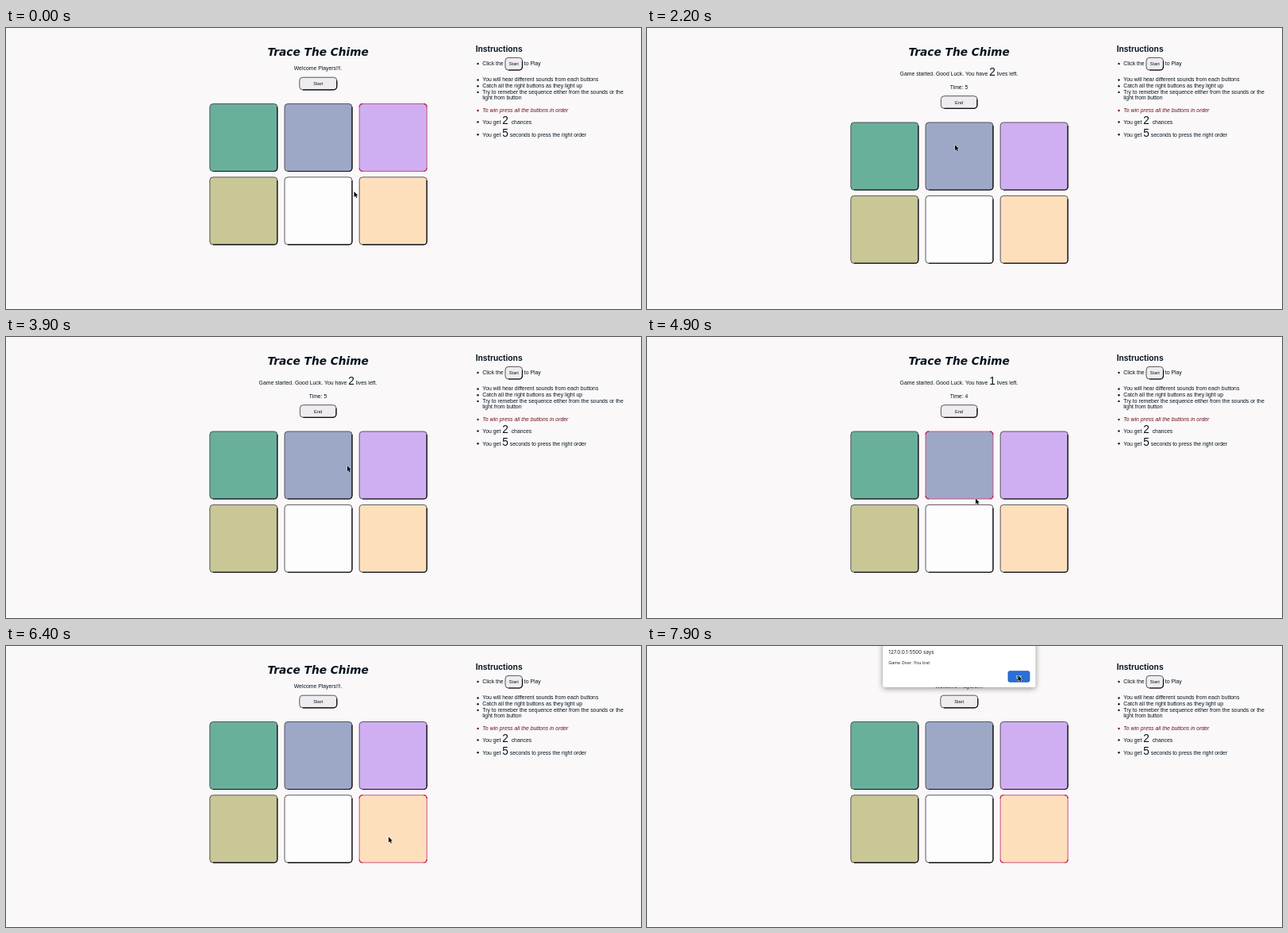
Write an HTML page with a canvas that moves like this. It is 800x354 px and loops after 8000 ms.

```html
<!DOCTYPE html>
<html lang="en">
<head>
<meta charset="utf-8">
<title>Trace The Chime</title>
<style>
  html, body { margin: 0; width: 100%; height: 100%; overflow: hidden; background: #faf8f9; }
  canvas { display: block; width: 800px; height: 354px; }
</style>
</head>
<body>
<canvas id="stage"></canvas>
<script>
const W = 800, H = 354, LOOP = 8000, STEP = 100;
const canvas = document.getElementById('stage');
const ctx = canvas.getContext('2d');
const dpr = window.devicePixelRatio || 1;
canvas.width = W * dpr;
canvas.height = H * dpr;

const SANS = '"Liberation Sans", Arial, sans-serif';
const TITLE = 'italic bold 13.73px "DejaVu Sans", Verdana, sans-serif';
const BODY = '6.87px ' + SANS;
const BIG = '13.73px ' + SANS;
const SMALL = '5.72px ' + SANS;
const INK = '#07141f', MAROON = '#6b0f1a';

const COLORS = ['#69b09c', '#9da8c6', '#cfaff1', '#c9c796', '#fefdfe', '#fddfbc'];
const TILE = 85, BLUE = 1, PURPLE = 2, PEACH = 5, START = 6;

// Moments of the game, in ms
const BEGIN = 1450, PLAYABLE = 4250, WRONG = 4650, TICK_4 = 4650, TICK_3 = 5650,
      LOST = 6250, ALERT = 6650, OK_HOVER = 7650;

// Pointer stops: time, x, y
const PATH = [
  [0, 438.5, 206], [50, 438.5, 206], [700, 399.5, 71], [1400, 399.5, 71],
  [2200, 388, 147.2], [3000, 388, 147.2], [3900, 430, 162.3], [4500, 416, 172],
  [4700, 416, 172], [4900, 414, 203.5], [5600, 482, 240.5], [7150, 482, 240.5],
  [7800, 467.5, 37]
];

function pointerAt(t) {
  const next = PATH.findIndex(p => p[0] > t);
  if (next < 0) return PATH[PATH.length - 1].slice(1);
  const [t0, x0, y0] = PATH[next - 1], [t1, x1, y1] = PATH[next];
  const u = (t - t0) / (t1 - t0), e = u * u * (3 - 2 * u);
  return [x0 + (x1 - x0) * e, y0 + (y1 - y0) * e];
}

function text(str, x, y, font = BODY, color = INK, align = 'left') {
  ctx.font = font;
  ctx.fillStyle = color;
  ctx.textAlign = align;
  ctx.fillText(str, x, y);
}

function widthOf(str, font) {
  ctx.font = font;
  return ctx.measureText(str).width;
}

// Draws [string, font] pairs one after another
function run(parts, x, y, centered) {
  if (centered) x -= parts.reduce((sum, [s, f]) => sum + widthOf(s, f), 0) / 2;
  for (const [s, f] of parts) {
    text(s, x, y, f);
    x += widthOf(s, f);
  }
}

function roundRect(x, y, w, h, r) {
  ctx.beginPath();
  ctx.roundRect(x, y, w, h, r);
}

function button(x, y, w, h, fill, hovered) {
  const r = 4;
  roundRect(x, y, w, h, r);
  ctx.fillStyle = fill;
  ctx.fill();
  ctx.lineWidth = 0.9;
  ctx.strokeStyle = hovered ? '#cb3f7c' : '#4a464c';
  ctx.stroke();
  if (hovered) {
    ctx.strokeStyle = '#c01f55';
    ctx.lineWidth = 1.3;
    for (const [cx, cy, a] of [[x + r, y + r, 2], [x + w - r, y + r, 3],
                               [x + w - r, y + h - r, 0], [x + r, y + h - r, 1]]) {
      ctx.beginPath();
      ctx.arc(cx, cy, r, a * Math.PI / 2, (a + 1) * Math.PI / 2);
      ctx.stroke();
    }
    return;
  }
  ctx.strokeStyle = '#0c0a10';
  ctx.lineWidth = 1.2;
  ctx.beginPath();
  ctx.moveTo(x + w, y + r);
  ctx.arcTo(x + w, y + h, x + w - r, y + h, r);
  ctx.lineTo(x + r, y + h);
  ctx.stroke();
}

function bullet(y, color = INK) {
  ctx.beginPath();
  ctx.arc(594.5, y, 1.2, 0, 7);
  ctx.fillStyle = color;
  ctx.fill();
}

function instructions() {
  const x = 600.3;
  text('Instructions', 591.7, 30.2, 'bold 10.3px ' + SANS);
  bullet(45);
  text('Click the', x, 47.3);
  button(629, 37.4, 21.5, 15.6, '#eeecee');
  text('Start', 639.8, 47.1, SMALL, INK, 'center');
  text('to Play', 652.8, 47.3);
  ['You will hear different sounds from each buttons',
   'Catch all the right buttons as they light up',
   'Try to remeber the sequence either from the sounds or the',
   'light from button'].forEach((line, i) => {
    if (i < 3) bullet(65.5 + i * 7.7);
    text(line, x, 67.3 + i * 7.7);
  });
  bullet(104, MAROON);
  text('To win press all the buttons in order', x, 106, 'italic ' + BODY, MAROON);
  bullet(118.5);
  run([['You get ', BODY], ['2 ', BIG], ['chances', BODY]], x, 120.7);
  bullet(134.3);
  run([['You get ', BODY], ['5', BIG], [' seconds to press the right order', BODY]], x, 136.5);
}

function tileBox(i, top) {
  return [256.8 + (i % 3) * 94.2, top + Math.floor(i / 3) * 92.4, TILE, TILE];
}

const inside = ([px, py], [x, y, w, h]) => px >= x && px <= x + w && py >= y && py <= y + h;

function hoveredItem(t, pointer, top) {
  if (t < 150) return PURPLE;
  if (t > ALERT) return PEACH;
  if (t > BEGIN && t < PLAYABLE) return -1;
  if (t < BEGIN && inside(pointer, [369.8, 62.2, 47, 16])) return START;
  return COLORS.findIndex((_, i) => inside(pointer, tileBox(i, top)));
}

function dialog(hoverOk) {
  ctx.save();
  ctx.shadowColor = 'rgba(0,0,0,.42)';
  ctx.shadowBlur = 7 * dpr;
  ctx.shadowOffsetY = 1.5 * dpr;
  roundRect(297, -6, 192.5, 58, 2.5);
  ctx.fillStyle = '#fff';
  ctx.fill();
  ctx.restore();
  text('127.0.0.1:5500 says', 304.3, 10.4, '6.4px Inter, sans-serif', '#222226');
  text('Game Over. You lost.', 304.3, 22.7, '5.4px Inter, sans-serif', '#222226');
  roundRect(455, 31.7, 27, 13.6, 2);
  ctx.fillStyle = hoverOk ? '#2a6fd6' : '#1b6be0';
  ctx.fill();
  if (hoverOk) {
    ctx.strokeStyle = '#1c56b4';
    ctx.lineWidth = 0.8;
    ctx.stroke();
  }
  text('OK', 468.5, 40.5, '500 5.4px Inter, sans-serif', '#e8f0ff', 'center');
}

function drawPointer([x, y]) {
  ctx.beginPath();
  [[0, 0], [0, 7], [1.6, 5.6], [2.7, 8.1], [3.9, 7.6], [2.8, 5.1], [4.9, 5]]
    .forEach(([dx, dy]) => ctx.lineTo(x + dx, y + dy));
  ctx.closePath();
  ctx.lineJoin = 'round';
  ctx.lineWidth = 0.9;
  ctx.strokeStyle = 'rgba(255,255,255,.8)';
  ctx.stroke();
  ctx.fillStyle = '#08080a';
  ctx.fill();
}

function draw(t) {
  const playing = t > BEGIN && t < LOST;
  const top = playing ? 119 : 95.5;
  const pointer = pointerAt(t);
  const hovered = hoveredItem(t, pointer, top);

  ctx.setTransform(dpr, 0, 0, dpr, 0, 0);
  ctx.fillStyle = '#faf8f9';
  ctx.fillRect(0, 0, W, H);
  ctx.fillStyle = '#fff';
  ctx.fillRect(0, H - 1, W, 1);

  text('Trace The Chime', 393.2, 34.6, TITLE, INK, 'center');
  if (playing) {
    const lives = t < WRONG ? '2' : '1';
    const left = t < TICK_4 ? 5 : t < TICK_3 ? 4 : 3;
    run([['Game started. Good Luck. You have ', BODY], [lives, BIG], [' lives left.', BODY]], 393, 60, true);
    text('Time: ' + left, 393, 76.7, BODY, INK, 'center');
    button(370.4, 85.7, 45.6, 15.6, '#eeecee');
    text('End', 393.2, 95.6, SMALL, INK, 'center');
  } else {
    text('Welcome Players!!!.', 393.2, 53, BODY, INK, 'center');
    button(369.8, 62.2, 47, 15.6, '#eeecee', hovered === START);
    text('Start', 393.2, 72.1, SMALL, INK, 'center');
  }
  COLORS.forEach((color, i) => button(...tileBox(i, top), color, hovered === i));
  instructions();
  if (t > ALERT) dialog(t > OK_HOVER);
  drawPointer(pointer);
}

const origin = performance.now();
function frame() {
  const t = (performance.now() - origin) % LOOP;
  draw(Math.floor(t / STEP) * STEP);
  requestAnimationFrame(frame);
}
frame();
</script>
</body>
</html>
```
